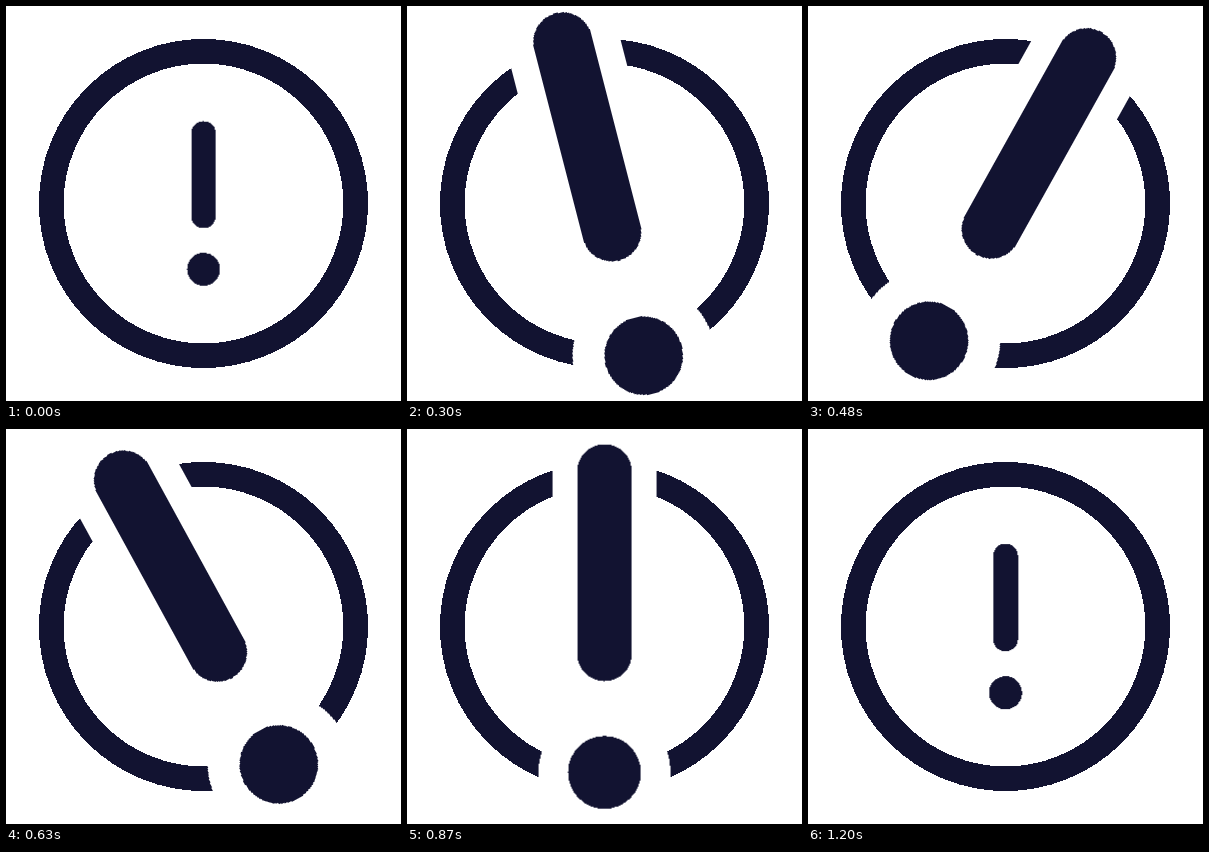
An HTML page for the animation above (1.23 s loop, 395 by 395 pixels).

```html
<!DOCTYPE html>
<html lang="en">
<head>
<meta charset="utf-8">
<title>Alert icon</title>
<style>
  html, body {
    margin: 0;
    width: 100%;
    height: 100%;
    overflow: hidden;
    background: #fff;
  }
  svg {
    display: block;
    width: 100vw;
    height: 100vh;
    shape-rendering: crispEdges;
    --ink: #121331;
    --loop: 1230ms;
  }
  .ring { fill: none; stroke: var(--ink); stroke-width: 1.5; }
  .bar { stroke: var(--ink); stroke-width: 1.5; stroke-linecap: round; }
  .dot { fill: var(--ink); }

  /* white margin that cuts the ring open */
  .gap .bar { stroke: #fff; stroke-width: 2.86; }
  .gap .dot { fill: #fff; }

  .grow, .swing { transform-origin: 12px 12px; }
  .grow { animation: grow var(--loop) infinite; }
  .swing { animation: swing var(--loop) cubic-bezier(.333, 0, .667, 1) infinite; }

  @keyframes grow {
    0% { transform: scale(1); animation-timing-function: cubic-bezier(.35, 0, .4, 1); }
    19.512% { transform: scale(2.387); animation-timing-function: linear; }
    60.163% { transform: scale(2.387); animation-timing-function: cubic-bezier(.5, 0, .5, 1); }
    100% { transform: scale(1); }
  }
  @keyframes swing {
    0%, 19.512%, 60.163%, 100% { transform: rotate(0deg); }
    29.675%, 50% { transform: rotate(-30deg); }
    39.837% { transform: rotate(30deg); }
  }
</style>
</head>
<body>
<svg viewBox="0 0 24 24" aria-label="Alert">
  <circle class="ring" cx="12" cy="12" r="9.25"/>
  <g class="grow">
    <g class="swing">
      <g class="gap">
        <path class="bar" d="M12 7.75V12.75"/>
        <circle class="dot" cx="12" cy="16" r="1.81"/>
      </g>
      <path class="bar" d="M12 7.75V12.75"/>
      <circle class="dot" cx="12" cy="16" r="1"/>
    </g>
  </g>
</svg>
</body>
</html>
```
